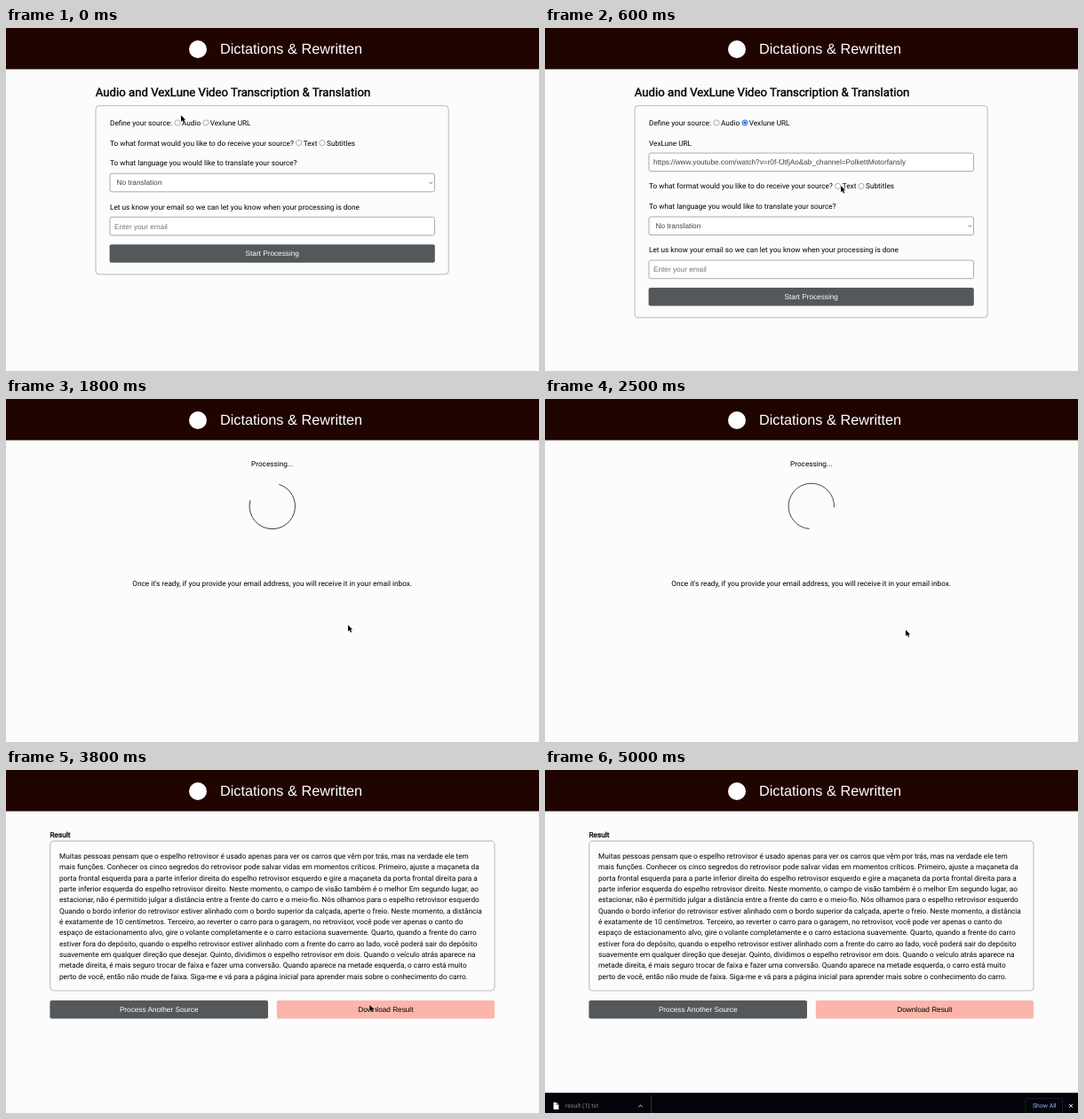
Recreate the animation shown at these times as an HTML page. Size 600 by 387 pixels, loop 5.2 s.

```html
<!DOCTYPE html>
<html lang="en">
<head>
<meta charset="utf-8">
<title>Dictations &amp; Rewritten</title>
<style>
  html, body { margin: 0; width: 100%; height: 100%; overflow: hidden; background: #fcfcfc; }
  svg { display: block; width: 600px; height: 387px; }
  text { font: 8.23px Roboto, sans-serif; text-rendering: geometricPrecision; white-space: pre; }
  .ui { font-family: "Liberation Sans", Arial, sans-serif; }
  .brand { font-size: 16.3px; }
  .title { font-size: 13.2px; stroke: #000; stroke-width: .4px; }
  .bold { stroke: #000; stroke-width: .3px; }
  .small { font-size: 6.9px; }
  .mid { text-anchor: middle; }
</style>
</head>
<body>
<svg id="stage" viewBox="0 0 600 387"></svg>
<script>
const STEP = 100, LOOP = 5200, LAST = 50;
const FIELD = '#4d3b3c', BLUE = '#1767d8', SLATE = '#54585b';
const EMAIL = 'filomirdea';
const VIDEO = 'https://www.youtube.com/watch?v=r0f-fJtfjAo&ab_channel=PolkettMotorfansly';
const RESULT = [
  'Muitas pessoas pensam que o espelho retrovisor é usado apenas para ver os carros que vêm por trás, mas na verdade ele tem',
  'mais funções. Conhecer os cinco segredos do retrovisor pode salvar vidas em momentos críticos. Primeiro, ajuste a maçaneta da',
  'porta frontal esquerda para a parte inferior direita do espelho retrovisor esquerdo e gire a maçaneta da porta frontal direita para a',
  'parte inferior esquerda do espelho retrovisor direito. Neste momento, o campo de visão também é o melhor Em segundo lugar, ao',
  'estacionar, não é permitido julgar a distância entre a frente do carro e o meio-fio. Nós olhamos para o espelho retrovisor esquerdo',
  'Quando o bordo inferior do retrovisor estiver alinhado com o bordo superior da calçada, aperte o freio. Neste momento, a distância',
  'é exatamente de 10 centímetros. Terceiro, ao reverter o carro para o garagem, no retrovisor, você pode ver apenas o canto do',
  'espaço de estacionamento alvo, gire o volante completamente e o carro estaciona suavemente. Quarto, quando a frente do carro',
  'estiver fora do depósito, quando o espelho retrovisor estiver alinhado com a frente do carro ao lado, você poderá sair do depósito',
  'suavemente em qualquer direção que desejar. Quinto, dividimos o espelho retrovisor em dois. Quando o veículo atrás aparece na',
  'metade direita, é mais seguro trocar de faixa e fazer uma conversão. Quando aparece na metade esquerda, o carro está muito',
  'perto de você, então não mude de faixa. Siga-me e vá para a página inicial para aprender mais sobre o conhecimento do carro.'
];
// step, x, y of the pointer tip
const POINTER = [
  [0, 197, 98.5], [2, 224, 105], [4, 260, 150], [6, 333, 178], [7, 329, 177], [8, 220, 222],
  [9, 200, 268], [12, 350, 296], [14, 386, 300], [16, 385, 255], [24, 385, 255],
  [30, 511, 287.5], [32, 511, 287.5], [36, 440, 260], [40, 378.6, 269.8], [50, 378.6, 269.8]
];

const clamp = v => Math.max(0, Math.min(1, v));
const esc = s => s.replace(/&/g, '&amp;');
const text = (x, y, s, cls = '', fill = '#000') =>
  `<text x="${x}" y="${y}" class="${cls}" fill="${fill}">${esc(s)}</text>`;
const rect = (x, y, w, h, fill, r = 0, stroke = 'none', sw = 1) =>
  `<rect x="${x}" y="${y}" width="${w}" height="${h}" rx="${r}" fill="${fill}" stroke="${stroke}" stroke-width="${sw}"/>`;
const circle = (x, y, r, fill, stroke = 'none', sw = 1) =>
  `<circle cx="${x}" cy="${y}" r="${r}" fill="${fill}" stroke="${stroke}" stroke-width="${sw}"/>`;
const line = (d, stroke, sw = 1) =>
  `<path d="${d}" fill="none" stroke="${stroke}" stroke-width="${sw}"/>`;
const group = (x, y, body, extra = '') => `<g transform="translate(${x} ${y})" ${extra}>${body}</g>`;

const radio = (x, y, on) => on
  ? circle(x, y, 3, '#fff', BLUE) + circle(x, y, 1.7, BLUE)
  : circle(x, y, 3.1, '#fff', '#767676', .6);

function field(y, value, fill, focus, x = 122) {
  const frame = rect(117, y, 365.5, 20.6, '#fff', 2, focus ? BLUE : '#a3a3a3', focus ? 1.7 : .9);
  return frame + text(x, y + 13.2, value + (focus ? '|' : ''), 'ui', fill);
}

const button = (x, y, w, label, fill, ink) =>
  rect(x, y, w, 20.6, fill, 2) + text(x + w / 2, y + 13.2, label, 'ui mid', ink);

const header = () => rect(0, 0, 600, 46.5, '#200400') + circle(216, 24, 10, '#fff')
  + text(241, 29.4, 'Dictations & Rewritten', 'ui brand', '#fff');

function formPage(s) {
  const link = s >= 2, shift = link ? 48.8 : 0;
  const typed = EMAIL.slice(0, s < 10 ? 0 : (s - 9) * 5);
  const rest = text(117, 132.6, 'To what format would you like to do receive your source?')
    + radio(329.7, 129.6, s >= 7) + text(334.7, 132.6, 'Text')
    + radio(356, 129.6, false) + text(361, 132.6, 'Subtitles')
    + text(117, 155.2, 'To what language you would like to translate your source?')
    + field(164.2, s >= 9 ? 'Portuguese' : 'No translation', FIELD, false, 124.5)
    + line('M476.3 173.7l1.9 1.9l1.9-1.9', '#555', .8)
    + text(117, 204.7, 'Let us know your email so we can let you know when your processing is done')
    + field(213.3, typed || 'Enter your email', typed ? FIELD : '#757575', s >= 10 && s < 14)
    + button(116.6, 244.2, 366.2, 'Start Processing', SLATE, '#fff');
  return text(100.8, 77, 'Audio and VexLune Video Transcription & Translation', 'title')
    + rect(101, 87.7, 397.2, 190.3 + shift, 'none', 4, '#b8b8b8')
    + text(117, 110, 'Define your source:')
    + radio(193, 106.9, false) + text(198, 110, 'Audio')
    + radio(225, 106.9, link) + text(229.7, 110, 'Vexlune URL')
    + (link ? text(117, 132.6, 'VexLune URL') + field(141.1, s >= 4 ? VIDEO : '', FIELD, s === 3) : '')
    + group(0, shift, rest);
}

const processingPage = s => text(299.7, 76.4, 'Processing...', 'mid')
  + `<circle r="25.7" fill="none" stroke="#3a3a3a" stroke-width=".9" pathLength="360" stroke-dasharray="268 92"
      transform="translate(299.8 120.9) rotate(${24 * (s - 18) - 73})"/>`
  + text(299.7, 210.6, "Once it's ready, if you provide your email address, you will receive it in your email inbox.", 'mid');

const resultPage = () => text(49.5, 76.4, 'Result', 'bold')
  + rect(49.7, 80.2, 500.3, 168.8, '#fcfcfc', 4, '#c2c2c2', 1.2)
  + RESULT.map((row, i) => text(60, 99.8 + i * 12.36, row)).join('')
  + button(49.4, 260, 245.6, 'Process Another Source', SLATE, '#fff')
  + button(304.8, 260, 245.2, 'Download Result', '#fcb5aa', '#000');

function downloadBar(s) {
  const open = 1 - (1 - clamp((s - 43) / 6)) ** 2, edge = 26.5 + 93 * open;
  const fade = clamp((47 - s) / 4);
  const page = '<path d="M-2.8-4h3.2l2.6 2.6v5.4h-5.8z" fill="#fff"/>' + line('M.4-4v2.6h2.6', '#04050a', .5);
  const badge = circle(0, 0, 19.5, '#e9eaed')
    + '<path d="M-2-8h4v5h3.5l-5.5 5.5l-5.5-5.5h3.5z" fill="#a9bfe8"/>' + rect(-8, 9.5, 16, 2.4, '#b3c5e6', 1);
  return group(16, 344.5, badge, `opacity="${fade}"`)
    + rect(0, 364.2, 600, 22.8, '#04050a')
    + group(12.4, 379, circle(0, 0, 6.3, 'none', '#9db9d8', 1.2), `opacity="${fade}"`)
    + group(12.4, 379, page)
    + `<clipPath id="item"><rect y="364" width="${edge}" height="23"/></clipPath><g clip-path="url(#item)">`
    + (open > 0 ? text(23, 381.4, 'result (1).txt', 'small', '#858585') + line('M105.3 380.2l2.2-2.2l2.2 2.2', '#ddd') : '')
    + '</g>' + line(`M${edge} 367v20`, '#3a3d44', .8)
    + rect(541, 370.5, 41.5, 20, 'none', 2, '#1c2430', .8)
    + text(549, 381.2, 'Show All', 'small', '#8fb6f2')
    + line('M590 376.8l4 4m0-4l-4 4', '#fff');
}

function pointer(s) {
  if (s === 10 || s === 11 || s >= 49) return '';
  const i = POINTER.findIndex(p => p[0] > s), [a, ax, ay] = POINTER[i - 1], [b, bx, by] = POINTER[i];
  const k = (s - a) / (b - a), hand = s === 13 || s === 14 || s >= 39;
  const shape = hand
    ? '<path d="M-.7.4q.6-.8 1.3 0v2.8l2.7.7q.8.4.6 1.4l-.7 3.2h-3.6l-2.5-3.2q.1-1 1.1-.5l1.1.9z" fill="#fff" stroke="#222" stroke-width=".7"/>'
    : '<path d="M0 0v7.2l1.7-1.5l1.3 2.7l1.2-.5l-1.3-2.6h2.3z" fill="#000" stroke="#fff" stroke-width=".7" paint-order="stroke"/>';
  return group(ax + (bx - ax) * k, ay + (by - ay) * k, shape);
}

const stage = document.getElementById('stage');
let shown = -1;

function tick() {
  const s = Math.min(LAST, Math.floor(performance.now() % LOOP / STEP));
  if (s !== shown) {
    shown = s;
    const page = s < 15 ? formPage(s) : s < 38 ? processingPage(s) : resultPage();
    stage.innerHTML = header() + page + (s >= 43 ? downloadBar(s) : '') + pointer(s);
  }
  requestAnimationFrame(tick);
}
tick();
</script>
</body>
</html>
```
